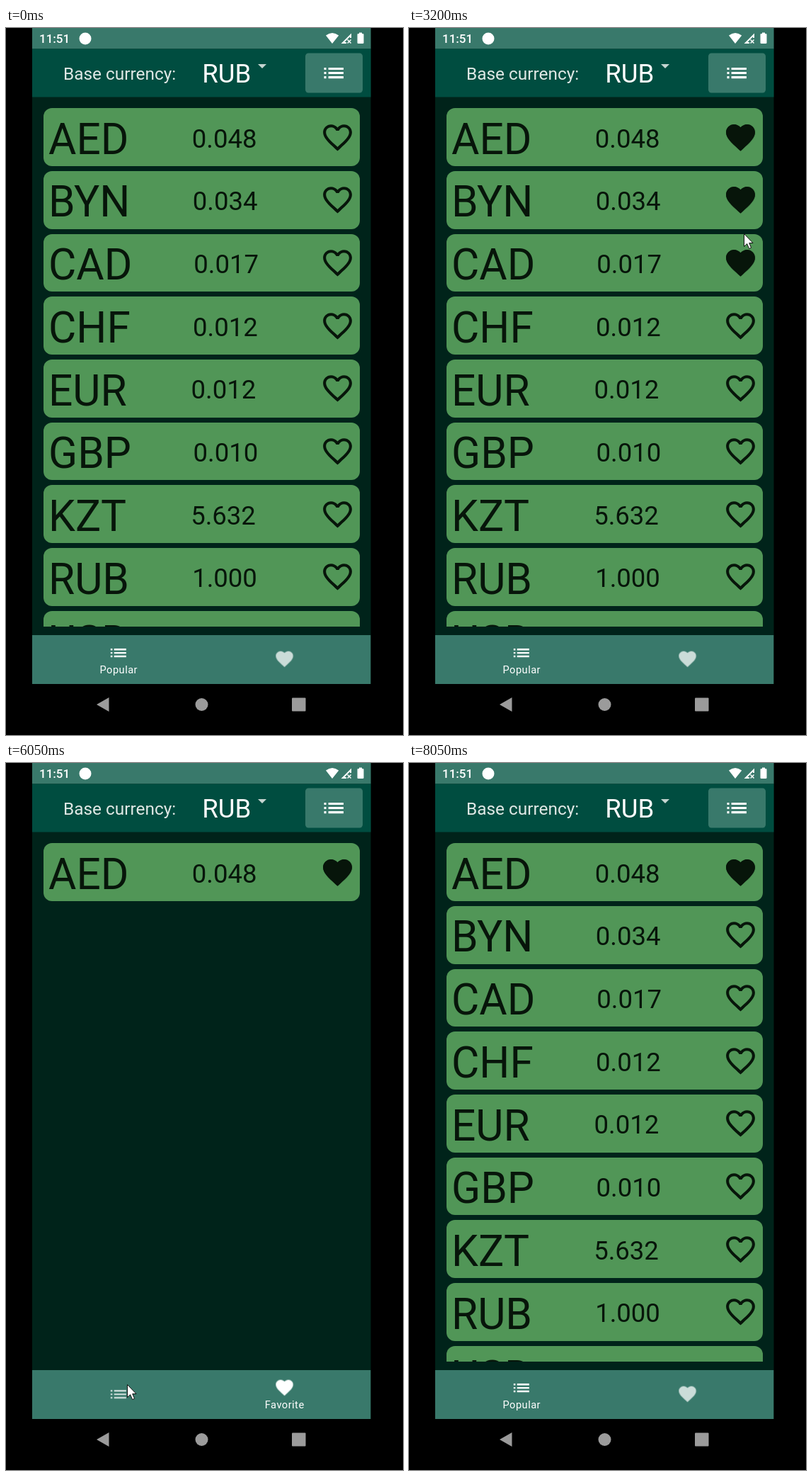
An HTML page that plays this animation: 561 by 998 pixels, repeating every 8100 ms.

```html
<!DOCTYPE html>
<html lang="en">
<head>
<meta charset="utf-8">
<title>Currency list</title>
<style>
  html, body { margin: 0; width: 100%; height: 100%; overflow: hidden; background: #000; }
  body { position: relative; font-family: Roboto, "Open Sans", sans-serif; --loop: 8100ms; }
  .chrome, .cursor { position: absolute; left: 0; top: 0; display: block; }

  .list { position: absolute; left: 37px; top: 97px; width: 478.5px; height: 748px; overflow: hidden; }
  .row {
    position: absolute; left: 15.5px; width: 447px; height: 81.8px; box-sizing: border-box;
    padding: 0 6.5px 0 7.5px; border-radius: 12px; background: #519657; color: #07150a;
    display: flex; align-items: center; line-height: 81.8px; white-space: nowrap;
  }
  .code { font-size: 60.4px; position: relative; top: 3.5px; }
  .rate { font-size: 36.5px; flex: 1; text-align: center; position: relative; top: 2.4px; }
  .row svg { width: 49px; height: 49px; fill: #07150a; flex: none; }
  .full { opacity: 0; }

  /* One percent of the loop is 81 ms. */
  .other { animation: other var(--loop) step-end infinite; }
  .row.BYN { animation: dropByn var(--loop) infinite; }
  .row.CAD { animation: dropCad var(--loop) infinite; }
  .AED .full { animation: likeAed var(--loop) step-end infinite; }
  .BYN .full { animation: likeByn var(--loop) step-end infinite; }
  .CAD .full { animation: likeCad var(--loop) step-end infinite; }
  @keyframes other { 0%, 76.54% { visibility: visible; } 50.62% { visibility: hidden; } }
  @keyframes dropByn { 0%, 67.3% { opacity: 1; } 68.5%, 76.53% { opacity: 0; } 76.54%, 100% { opacity: 1; } }
  @keyframes dropCad { 0%, 61.1% { opacity: 1; } 62.3%, 76.53% { opacity: 0; } 76.54%, 100% { opacity: 1; } }
  @keyframes likeAed { 0% { opacity: 0; } 19.75%, 100% { opacity: 1; } }
  @keyframes likeByn { 0%, 68.5% { opacity: 0; } 27.78% { opacity: 1; } }
  @keyframes likeCad { 0%, 62.3% { opacity: 0; } 35.2% { opacity: 1; } }

  .popIcon { animation: popIcon var(--loop) linear infinite; }
  .favIcon { animation: favIcon var(--loop) linear infinite; }
  .popLabel { animation: popLabel var(--loop) linear infinite; }
  .favLabel { animation: favLabel var(--loop) linear infinite; }
  @keyframes popIcon {
    0%, 50.74%, 77.96%, 100% { transform: translateY(0); opacity: 1; }
    52.16%, 76.54% { transform: translateY(9px); opacity: .7; }
  }
  @keyframes favIcon {
    0%, 50.74%, 77.96%, 100% { transform: translateY(9px); opacity: .74; }
    52.16%, 76.54% { transform: translateY(0); opacity: 1; }
  }
  @keyframes popLabel {
    0%, 50.74%, 77.96%, 100% { transform: translateY(0); opacity: 1; }
    51.85% { transform: translateY(8px); opacity: .12; }
    52.16%, 76.54% { transform: translateY(9px); opacity: 0; }
  }
  @keyframes favLabel {
    0%, 50.74%, 77.96%, 100% { transform: translateY(9px); opacity: 0; }
    51.85% { transform: translateY(2px); opacity: .85; }
    52.16%, 76.54% { transform: translateY(0); opacity: 1; }
  }

  .ripple { fill: #fff; opacity: 0; transform-box: fill-box; transform-origin: center; }
  .ripple.fav { animation: rippleFav var(--loop) linear infinite; }
  .ripple.pop { animation: ripplePop var(--loop) linear infinite; }
  @keyframes rippleFav {
    0%, 49.9% { transform: scale(.3); opacity: 0; }
    50.6% { opacity: .24; }
    51.7% { transform: scale(1); }
    52.5% { opacity: .24; }
    55.5%, 100% { transform: scale(1); opacity: 0; }
  }
  @keyframes ripplePop {
    0%, 75.3% { transform: scale(.3); opacity: 0; }
    76% { opacity: .24; }
    77.1% { transform: scale(1); opacity: .24; }
    78.4% { opacity: .14; }
    80.2%, 100% { transform: scale(1); opacity: 0; }
  }

  .cursor {
    opacity: 0; overflow: visible;
    animation: move var(--loop) ease-in-out infinite, show var(--loop) step-end infinite;
  }
  @keyframes show { 0%, 84% { opacity: 0; } 15.4% { opacity: 1; } }
  @keyframes move {
    0%, 15.4% { transform: translate(500px, 215px); }
    19.1%, 20.7% { transform: translate(468px, 155px); }
    27.16%, 28.5% { transform: translate(468px, 243px); }
    34.57%, 36.4% { transform: translate(470px, 331px); }
    39.5%, 40.7% { transform: translate(473px, 290px); }
    46.3% { transform: translate(335px, 962px); }
    49.4% { transform: translate(321px, 890px); }
    51.85%, 54.3% { transform: translate(321px, 885px); }
    59.9%, 61.7% { transform: translate(467px, 335px); }
    66.67%, 67.9% { transform: translate(468px, 246px); }
    74.07% { transform: translate(172px, 880px); }
    74.69% { transform: translate(171px, 877px); }
    78.35%, 100% { transform: translate(165px, 861px); }
  }
</style>
</head>
<body>
<svg class="chrome" width="561" height="998" viewBox="0 0 561 998">
  <defs>
    <path id="heart" d="M12 21.35l-1.45-1.32C5.4 15.36 2 12.28 2 8.5 2 5.42 4.42 3 7.5 3c1.74 0 3.41.81 4.5 2.09C13.09 3.81 14.76 3 16.5 3 19.58 3 22 5.42 22 8.5c0 3.78-3.4 6.86-8.55 11.54z"/>
    <path id="outline" d="M16.5 3c-1.74 0-3.41.81-4.5 2.09C10.91 3.81 9.24 3 7.5 3 4.42 3 2 5.42 2 8.5c0 3.78 3.4 6.86 8.55 11.54L12 21.35l1.45-1.32C18.6 15.36 22 12.28 22 8.5 22 5.42 19.58 3 16.5 3zm-4.4 15.55l-.1.1-.1-.1C7.14 14.24 4 11.39 4 8.5 4 6.5 5.5 5 7.5 5c1.54 0 3.04.99 3.57 2.36h1.87C13.46 5.99 14.96 5 16.5 5c2 0 3.5 1.5 3.5 3.5 0 2.89-3.14 5.74-7.9 10.05z"/>
    <path id="lines" d="M3 7h2v2H3zM3 11h2v2H3zM3 15h2v2H3zM7 7h14v2H7zM7 11h14v2H7zM7 15h14v2H7z"/>
  </defs>

  <rect x="37" width="478.5" height="926" fill="#00231a"/>

  <!-- status bar -->
  <rect x="37" width="478.5" height="29.5" fill="#39796b"/>
  <g fill="#fff">
    <text x="47" y="21" font-size="17" font-weight="500">11:51</text>
    <circle cx="112" cy="15" r="8.5"/>
    <path d="M461 22L452 10.6Q461 3.6 470.2 10.6z"/>
    <path d="M473.5 22L488 7.5V14h-2v-1.8L478.5 20H481v2z"/>
    <path d="M482.5 16.5l5 5m0-5l-5 5" stroke="#fff" stroke-width="1.5"/>
    <path d="M499 6.5h4V8h1.2q1.3 0 1.3 1.3v11.4q0 1.3-1.3 1.3h-6.4q-1.3 0-1.3-1.3V9.3q0-1.3 1.3-1.3H499z"/>
  </g>

  <!-- header -->
  <rect x="37" y="29.5" width="478.5" height="68" fill="#004d40"/>
  <text x="81" y="73" font-size="24.4" fill="#dfe8e5">Base currency:</text>
  <text x="277.2" y="77" font-size="36.6" fill="#fff">RUB</text>
  <path d="M356 51h12l-6 6z" fill="#c5d5d1"/>
  <rect x="423" y="35.5" width="81" height="56" rx="4.5" fill="#39796b"/>
  <use href="#lines" transform="translate(444.9 45.2) scale(1.525)" fill="#fff"/>

  <!-- bottom tabs -->
  <svg x="37" y="857" width="478.5" height="69">
    <rect width="478.5" height="69" fill="#39796b"/>
    <circle class="ripple pop" cx="122" cy="34" r="121.5"/>
    <circle class="ripple fav" cx="356.5" cy="34" r="121"/>
    <g fill="#fff" font-size="14.6" letter-spacing=".49" text-anchor="middle">
      <g class="popIcon"><use href="#lines" transform="translate(107.2 10.4) scale(1.22)"/></g>
      <g class="favIcon"><use href="#heart" transform="translate(341.9 10) scale(1.22)"/></g>
      <text class="popLabel" x="122.3" y="54">Popular</text>
      <text class="favLabel" x="356.7" y="54">Favorite</text>
    </g>
  </svg>

  <!-- system buttons -->
  <g fill="#9b9b9b">
    <path d="M128 955L145.5 945v20z"/>
    <circle cx="276.5" cy="955" r="9"/>
    <rect x="404" y="945.5" width="19.5" height="19" rx="1"/>
  </g>
</svg>

<div class="list" id="list"></div>

<svg class="cursor" width="14" height="23" viewBox="0 0 14 23">
  <path d="M.5.5V18.5L4.7 14.6L7.6 21.5L10.6 20.2L7.7 13.5H13z" fill="#fff" stroke="#111"/>
</svg>

<script>
  const rates = {
    AED: "0.048", BYN: "0.034", CAD: "0.017", CHF: "0.012", EUR: "0.012",
    GBP: "0.010", KZT: "5.632", RUB: "1.000", USD: "0.013"
  };
  const pitch = 88.7;

  const row = ([code, rate], i) => `
    <div class="row ${code} ${i > 2 ? "other" : ""}" style="top:${16.2 + i * pitch}px">
      <span class="code">${code}</span>
      <span class="rate">${rate}</span>
      <svg viewBox="0 0 24 24"><use href="#outline"/><use class="full" href="#heart"/></svg>
    </div>`;

  document.getElementById("list").innerHTML = Object.entries(rates).map(row).join("");
</script>
</body>
</html>
```
